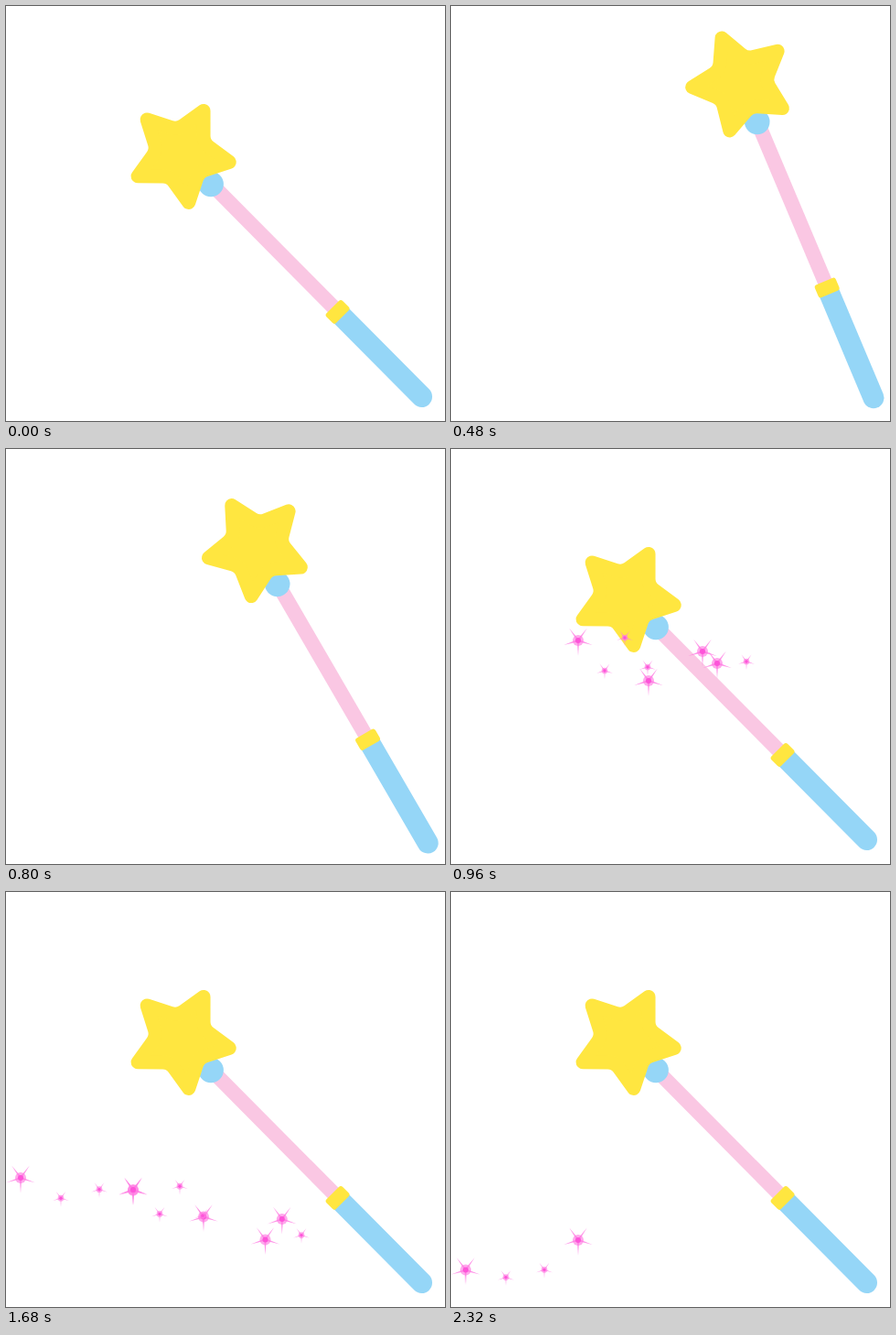
Write an HTML page that moves like this. It is 480 px wide and 453 px high and loops after 2400 ms.

```html
<!DOCTYPE html>
<html lang="en">
<head>
<meta charset="utf-8">
<title>Magic wand</title>
<style>
  html, body { margin: 0; width: 100%; height: 100%; overflow: hidden; background: #fff; }
  svg { display: block; width: 100vw; height: 100vh; }
</style>
</head>
<body>
<svg viewBox="0 0 480 453">
  <defs>
    <g id="spark"></g>
  </defs>
  <g id="wand">
    <rect x="-7.7" y="-131" width="16.1" height="196" fill="#fac7e3"/>
    <path d="M-11.5 70H11.5V196A11.5 11.5 0 0 1 -11.5 196Z" fill="#95d6f7"/>
    <rect x="-12.4" y="58" width="24.8" height="15" rx="3" fill="#ffe640"/>
    <circle cy="-131" r="13.8" fill="#95d6f7"/>
    <path id="star" transform="translate(0 -177)" fill="#ffe640" stroke="#ffe640" stroke-width="15" stroke-linejoin="round"/>
  </g>
  <g id="sparks"></g>
</svg>
<script>
const NS = "http://www.w3.org/2000/svg";
const LOOP = 2400, STEP = 80;
const RAISED = 640, RESTED = 960;      // end of the lift, end of the swing back
const LIFE = 1280, FLOOR = 438;        // a sparkle ends with its time or at the floor
const $ = id => document.getElementById(id);
const mix = (a, b, k) => a + (b - a) * k;

function add(parent, tag, attrs) {
  const el = document.createElementNS(NS, tag);
  for (const key in attrs) el.setAttribute(key, attrs[key]);
  return parent.appendChild(el);
}

function polar(r, deg) {
  const a = deg * Math.PI / 180;
  return [r * Math.cos(a), r * Math.sin(a)];
}

// Five-pointed star with softened notches; the stroke rounds its tips
function starPath(outer, inner, soft) {
  let d = "";
  for (let i = 0; i < 5; i++) {
    const a = -90 + i * 72;
    const tip = polar(outer, a), notch = polar(inner, a + 36), next = polar(outer, a + 72);
    const before = notch.map((v, j) => mix(v, tip[j], soft));
    const after = notch.map((v, j) => mix(v, next[j], soft));
    d += `${i ? "L" : "M"}${tip}L${before}Q${notch} ${after}`;
  }
  return d + "Z";
}

// Five fine rays around a soft core
function buildSpark(g) {
  for (let i = 0; i < 5; i++) {
    add(g, "path", {
      d: "M0 -1.2L16.5 0L0 1.2Z", transform: `rotate(${90 + i * 72})`,
      fill: "#ff7be2", "fill-opacity": 0.8
    });
  }
  add(g, "circle", { r: 6, fill: "#ff7be2", "fill-opacity": 0.65 });
  add(g, "circle", { r: 3, fill: "#fd55d9" });
}

// Each sparkle: x and y at the moment of rest, fall in px/s
const waves = [
  {
    from: RESTED,
    big: [[275, 221, 220], [291, 234, 171], [216, 253, 141], [139, 209, 162]],
    small: [[323, 232, 198], [215, 238, 160], [168, 242, 152], [190, 206, 160]]
  },
  {
    from: RESTED + STEP,
    big: [[139, 263, 86], [16, 199, 157]],
    small: [[60, 237, 135], [102, 226, 137]]
  }
];

const sparks = [];
for (const { from, big, small } of waves) {
  const make = (list, size, lean) => {
    for (const [x, y, fall] of list) {
      const drift = lean * Math.max(0, x - 216);
      sparks.push({ x, y, fall, drift, size, from, el: add($("sparks"), "use", { href: "#spark" }) });
    }
  };
  make(big, 1, 0.2);
  make(small, 0.56, 0);
}

// Share of the lift: slow raise, quick swing back, rest
function lift(t) {
  return t < RAISED ? t / RAISED : Math.max(0, (RESTED - t) / (RESTED - RAISED));
}

function draw(t) {
  const k = lift(t);
  $("wand").setAttribute("transform",
    `translate(${mix(316.4, 408.8, k)} ${mix(287.4, 233.7, k)}) rotate(${mix(-44.8, -15.6, k)})`);
  const sec = (t - RESTED) / 1000;
  for (const s of sparks) {
    const x = s.x + s.drift * sec, y = s.y + s.fall * sec;
    const on = t >= s.from && t <= s.from + LIFE && y < FLOOR;
    s.el.setAttribute("visibility", on ? "visible" : "hidden");
    s.el.setAttribute("transform", `translate(${x} ${y}) scale(${s.size})`);
  }
}

$("star").setAttribute("d", starPath(53.3, 27.3, 0.22));
buildSpark($("spark"));

const start = performance.now();
function tick() {
  const t = (performance.now() - start) % LOOP;
  draw(Math.floor(t / STEP) * STEP);
  requestAnimationFrame(tick);
}
draw(0);
requestAnimationFrame(tick);
</script>
</body>
</html>
```
